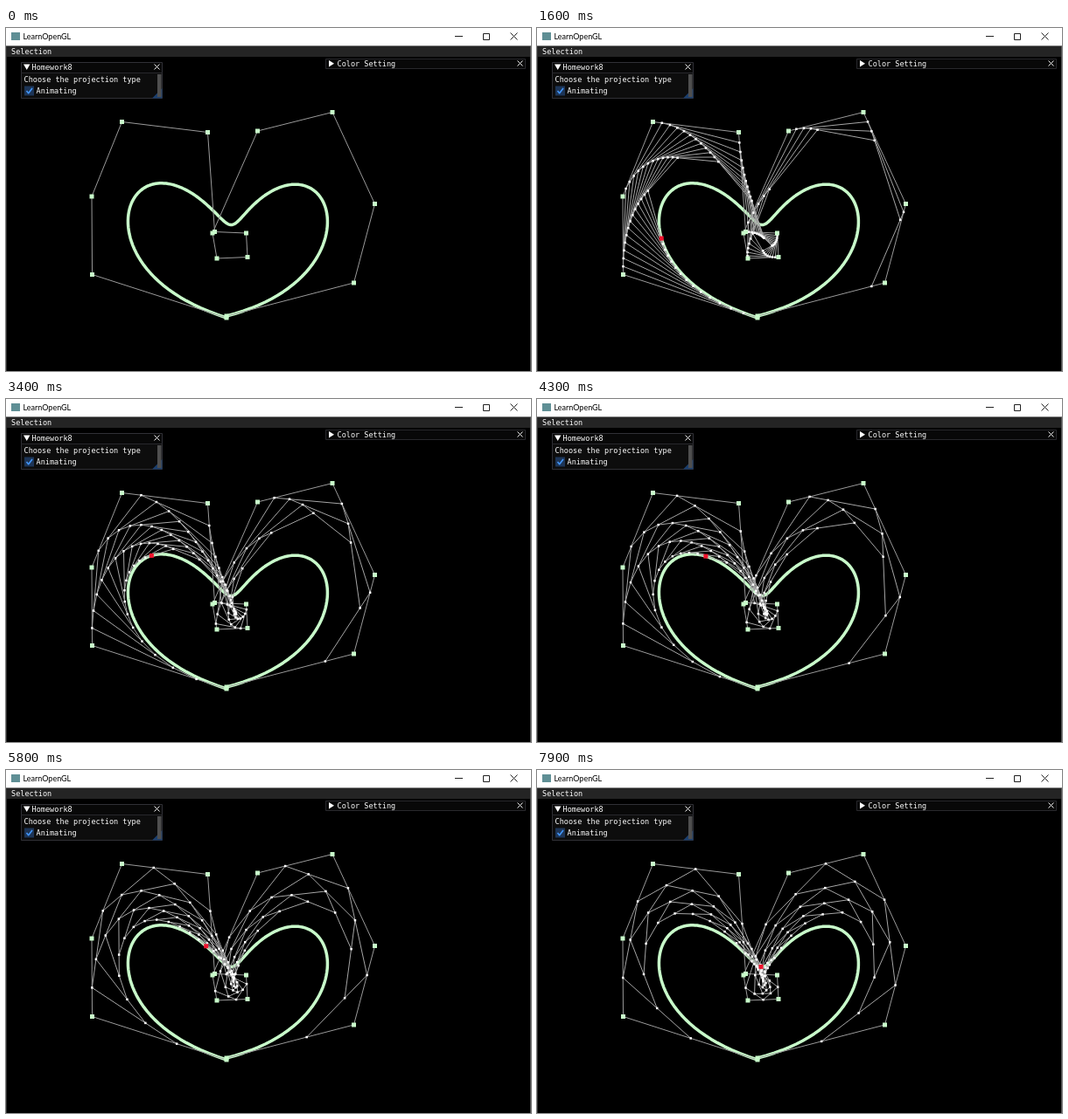
An HTML page with a canvas for the animation above (8 s loop, 600 by 393 pixels).

```html
<!DOCTYPE html>
<html>
<head>
<meta charset="utf-8">
<style>
html, body { margin: 0; width: 100%; height: 100%; overflow: hidden; background: #000; }
canvas { display: block; width: 600px; height: 393px; }
</style>
</head>
<body>
<canvas id="stage" width="600" height="393"></canvas>
<script>
const g = document.getElementById('stage').getContext('2d');
const LOOP = 8000, STEP = 100;
const MONO = '8.53px "DejaVu Sans Mono", monospace';
const GREEN = '#c8fbca';

const control = [
  [252, 332], [98.5, 282.5], [98, 193], [132.5, 107.5], [230.5, 119.5],
  [238.5, 233.5], [274.5, 235], [276, 262.5], [241, 264], [236, 235],
  [287.5, 118], [373, 96.5], [421.5, 201.5], [397.5, 292], [252, 330]
];

// Progress of the curve parameter: [time in ms, value]
const pace = [[0, 0], [800, .048], [2500, .1675], [4300, .281], [5800, .37], [6900, .44], [7900, .497]];

function progress(ms) {
  const i = Math.max(1, pace.findIndex(k => ms <= k[0]));
  const [t0, v0] = pace[i - 1], [t1, v1] = pace[i];
  return v0 + (v1 - v0) * (ms - t0) / (t1 - t0);
}

const reduce = (pts, u) => pts.slice(1).map(([x, y], i) => [
  pts[i][0] + (x - pts[i][0]) * u,
  pts[i][1] + (y - pts[i][1]) * u
]);

// All levels of De Casteljau's construction
function levels(u) {
  const all = [control];
  while (all[all.length - 1].length > 1) all.push(reduce(all[all.length - 1], u));
  return all;
}

const curve = Array.from({ length: 201 }, (_, i) => levels(i / 200).pop()[0]);

function rect(x, y, w, h, color) {
  g.fillStyle = color;
  g.fillRect(x, y, w, h);
}

function frame(x, y, w, h, color) {
  g.strokeStyle = color;
  g.lineWidth = 1;
  g.strokeRect(x + .5, y + .5, w - 1, h - 1);
}

function line(pts, color, width = 1) {
  g.strokeStyle = color;
  g.lineWidth = width;
  g.beginPath();
  pts.forEach(p => g.lineTo(...p));
  g.stroke();
}

function shape(pts, color) {
  g.fillStyle = color;
  g.beginPath();
  pts.forEach(p => g.lineTo(...p));
  g.fill();
}

function cross(x, y, s, color) {
  line([[x, y], [x + s, y + s]], color);
  line([[x + s, y], [x, y + s]], color);
}

function text(str, x, y, color = '#fff', font = MONO) {
  g.font = font;
  g.fillStyle = color;
  g.fillText(str, x, y);
}

function dot([x, y], size, color) {
  rect(x - size / 2, y - size / 2, size, size, color);
}

function drawWindow() {
  rect(0, 0, 600, 393, '#000');
  rect(0, 0, 600, 20.5, '#fff');
  rect(0, 21, 1, 372, '#333');
  rect(599, 21, 1, 372, '#555');
  rect(6, 5, 10, 9, '#5f8f95');
  text('LearnOpenGL', 19.5, 13, '#000', '9px Lato, sans-serif');
  line([[513, 9.5], [522, 9.5]], '#222');
  frame(545, 6, 8, 8, '#222');
  cross(576.5, 5.5, 8, '#222');
  rect(1, 21, 598, 12, '#242424');
  text('Selection', 6, 30);
}

function drawPanels() {
  rect(17, 39, 162, 42, '#0d0d0d');
  rect(17, 39, 162, 12, '#080808');
  frame(17, 39, 162, 42, '#303036');
  line([[17, 51.5], [179, 51.5]], '#28282c');
  shape([[20, 41.5], [27.5, 41.5], [23.75, 48]], '#fff');
  text('Homework8', 29.5, 48);
  cross(169.5, 41.5, 6, '#eee');
  text('Choose the projection type', 20.5, 62);
  rect(21, 66.5, 11, 11, '#1d3557');
  line([[23.5, 72], [25.7, 74.7], [30, 69]], '#4296fa', 1.6);
  text('Animating', 34.5, 75);
  shape([[167, 80.5], [178.5, 80.5], [178.5, 69]], '#1c3f6d');
  rect(173, 53, 4.5, 26, '#4f4f4f');

  rect(365, 35, 229, 12, '#080808');
  frame(365, 35, 229, 12, '#28282c');
  shape([[369, 37], [375, 40.7], [369, 44.5]], '#fff');
  text('Color Setting', 378.5, 44);
  cross(584.5, 37.5, 6, '#eee');
}

function drawCurve(u) {
  g.lineJoin = 'round';
  line(curve, GREEN, 3.5);
  const all = levels(u);
  line(control, '#9a9a9a');
  if (u > 0) {
    const inner = all.slice(1);
    inner.forEach(pts => line(pts, '#a6a6a6'));
    inner.forEach(pts => pts.forEach(p => dot(p, 2.5, '#fff')));
  }
  control.forEach(p => dot(p, 5, GREEN));
  if (u > 0) dot(all[all.length - 1][0], 5, '#f0142d');
}

function draw(now) {
  const ms = Math.floor(now % LOOP / STEP) * STEP;
  drawWindow();
  drawPanels();
  drawCurve(progress(ms));
}

const start = performance.now();
function tick() {
  draw(performance.now() - start);
  requestAnimationFrame(tick);
}
tick();
</script>
</body>
</html>
```
